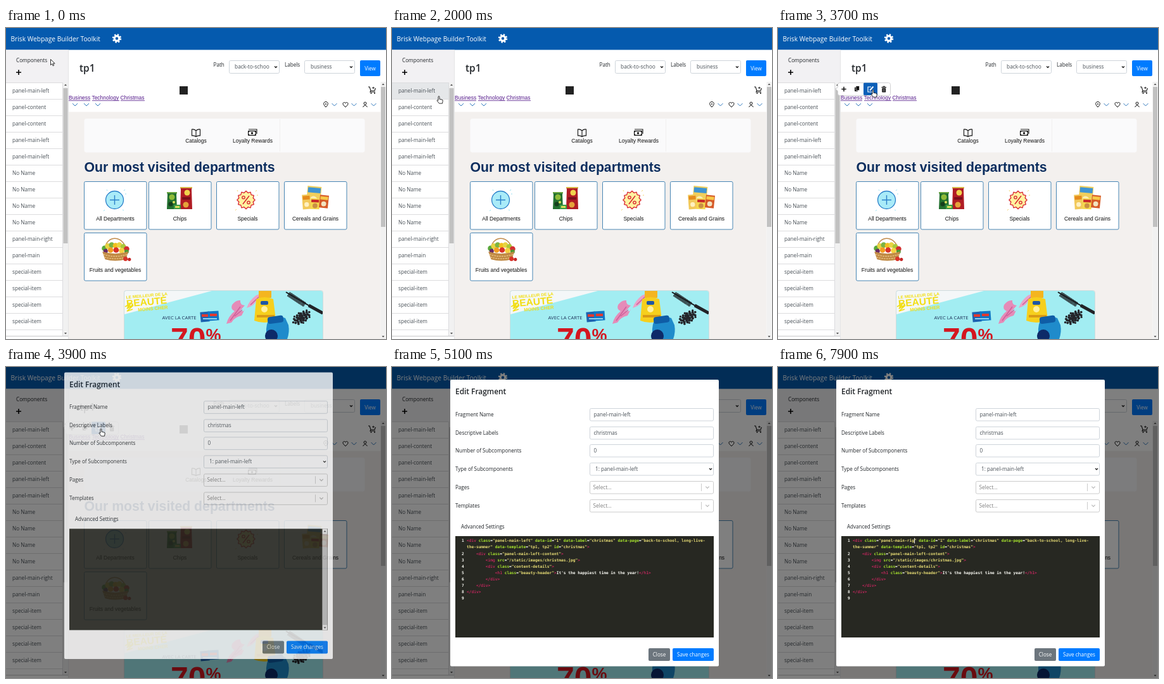
An HTML page that plays this animation: 600 px wide and 491 px high, repeating every 8 s.

```html
<!DOCTYPE html>
<html lang="en">
<head>
<meta charset="utf-8">
<title>Page builder demo</title>
<style>
  html, body { margin: 0; width: 100%; height: 100%; overflow: hidden; background: #fff; }
  svg { display: block; width: 600px; height: 491px; }
  text { font-family: 'Open Sans', sans-serif; white-space: pre; }
  .shop text { font-family: 'Liberation Sans', Arial, sans-serif; }
  .shop .ui { font-family: 'Open Sans', sans-serif; }
  .code text { font: bold 6.2px 'DejaVu Sans Mono', monospace; }
</style>
</head>
<body>
<svg id="stage" viewBox="0 0 600 491" xmlns="http://www.w3.org/2000/svg"></svg>
<script>
const LOOP = 8000, STEP = 100;
const INK = '#212529', BLUE = '#007bff', CHAR = 6.2 * 0.602;

// Drawing helpers
const rect = (x, y, w, h, fill, more = '') =>
  `<rect x="${x}" y="${y}" width="${w}" height="${h}" fill="${fill}" ${more}/>`;
const box = (x, y, w, h, stroke, r = 2, fill = '#fff') =>
  rect(x + .5, y + .5, w - 1, h - 1, fill, `stroke="${stroke}" rx="${r}"`);
const text = (x, y, s, size = 8.15, fill = INK, more = '') =>
  `<text x="${x}" y="${y}" font-size="${size}" fill="${fill}" ${more}>${s}</text>`;
const mid = (x, y, s, size, fill) => text(x, y, s, size, fill, 'text-anchor="middle"');
const bold = (x, y, s, size, fill) => text(x, y, s, size, fill, 'font-weight="bold"');
const line = (d, stroke, w = 1, more = '') =>
  `<path d="${d}" fill="none" stroke="${stroke}" stroke-width="${w}" ${more}/>`;
const shape = (d, fill, more = '') => `<path d="${d}" fill="${fill}" ${more}/>`;
const dot = (x, y, r, fill, more = '') => `<circle cx="${x}" cy="${y}" r="${r}" fill="${fill}" ${more}/>`;
const ring = (x, y, r, stroke, w = 1, more = '') =>
  dot(x, y, r, 'none', `stroke="${stroke}" stroke-width="${w}" ${more}`);
const group = (id, s, more = '') => `<g id="${id}" ${more}>${s}</g>`;
const moved = (transform, s) => `<g transform="${transform}">${s}</g>`;
const chevron = (x, y, stroke, w = 1, r = 4) =>
  line(`M${x - r} ${y - r / 2}l${r} ${r}l${r} ${-r}`, stroke, w);
const plus = (x, y, r, stroke, w) => line(`M${x - r} ${y}h${2 * r}M${x} ${y - r}v${2 * r}`, stroke, w);

function scrollbar(x, y, h, thumbY, thumbH) {
  const c = x + 4, b = y + h;
  return rect(x, y, 8, h, '#f1f1f1') + rect(x + .5, thumbY, 7, thumbH, '#c1c1c1') +
    shape(`M${c - 2} ${y + 5}l2 -2.5l2 2.5z`, '#505050') +
    shape(`M${c - 2} ${b - 5}l2 2.5l2 -2.5z`, '#505050');
}

function topBar() {
  return rect(0, 0, 600, 34.5, '#055aae') +
    text(7.5, 21.3, 'Brisk Webpage Builder Toolkit', 10.2, '#fff') +
    ring(175, 16.5, 3.8, '#fff', 3.2) + ring(175, 16.5, 6, '#fff', 2.4, 'stroke-dasharray="2.36"');
}

function sidebar() {
  const names = ['panel-main-left', 'panel-content', 'panel-content', 'panel-main-left', 'panel-main-left',
    'No Name', 'No Name', 'No Name', 'No Name', 'panel-main-right', 'panel-main',
    'special-item', 'special-item', 'special-item', 'special-item'];
  const rows = names.map((s, i) =>
    text(10, 102 + 26 * i, s, 8.2, '#495057') + rect(0, 112 + 26 * i, 89.5, 1, '#dcdcde')).join('');
  return rect(0, 34.5, 98, 52, '#f2f1f3') + text(16, 54, 'Components', 8.2) + plus(20, 70, 4, '#000', 1.6) +
    rect(0, 86, 98, 1, '#dcdcde') + rect(0, 87, 89.5, 25, '#e5e7e9', 'id="hover"') + rows +
    rect(89, 86, 1, 400, '#dcdcde') + scrollbar(90, 86, 400, 95, 245) +
    rect(0, 486, 98, 1, '#c8c8ca') + rect(98, 34.5, 1, 457, '#e4e4e6');
}

function toolbar() {
  const select = (x, w) => box(x, 51, w, 21, '#ced4da') + chevron(x + w - 6, 61.5, '#222', 1.3, 2);
  return text(116, 68.5, 'tp1', 15.4, INK, 'font-weight="600"') +
    text(327.5, 61, 'Path') + text(440, 61, 'Labels') + select(352, 80) + select(471, 80) +
    text(361, 64.4, 'back-to-schoo', 8.4, '#495057') + text(481, 64.4, 'business', 8.2, '#495057') +
    rect(559, 51, 32, 25, BLUE, 'rx="2"') + mid(575, 66.6, 'View', 8.2, '#fff');
}

function shopHeader() {
  const link = '#551a8b', nav = '#2f78bd';
  const cart = line('M572 93h2l2 6h6l1.5 -4M576 99l-1 2h8', '#111', 1.1) +
    dot(576.5, 103, 1, '#111') + dot(582, 103, 1, '#111') + plus(580, 94.5, 1.8, '#111', .9);
  const pin = line('M505 125c-6 -6 -2.5 -8.5 0 -8.5s6 2.5 0 8.5z', '#111') + dot(505, 120, .9, '#111');
  const heart = line('M536 125l-3.5 -3.5c-2 -4 2.5 -5.5 3.5 -2.5c1 -3 5.5 -1.5 3.5 2.5z', '#111');
  const person = ring(567, 119, 2, '#111') + line('M563.5 125q3.5 -6 7 0', '#111');
  return rect(274, 92, 13, 13, '#222') +
    text(99, 113.3, 'Business Technology Christmas', 8.45, link) +
    [[99, 34], [136, 43], [181, 38]].map(([x, w]) => rect(x, 114.3, w, .8, link)).join('') +
    [109, 127, 145, 518.5, 549.5, 580.5].map(x => chevron(x, 121, nav)).join('') +
    cart + pin + heart + person;
}

function quickLinks() {
  const book = line('M300 162q-3 -2.5 -6.5 -2v10q3.5 -.5 6.5 1.5q3 -2 6.5 -1.5v-10q-3.5 -.5 -6.5 2v9.5', '#111', 1.1);
  const cash = line('M383 160h13v7', '#111', 1.1) + rect(382, 162, 13, 8, '#111', 'rx="1"') +
    rect(383.2, 163.2, 10.6, 5.6, '#fff', 'rx="2"') + dot(388.5, 166, 1.7, '#111');
  return rect(123.5, 143, 443, 53.5, '#fafafb', 'rx="4"') + rect(432, 144, 1, 51, '#f1f0ef') +
    book + cash + mid(300, 181, 'Catalogs', 8.5, '#111') + mid(389.5, 181, 'Loyalty Rewards', 8.5, '#111');
}

function allIcon() {
  return dot(171.5, 271.5, 14, '#a9ebf8', 'stroke="#2a7fc9" stroke-width="1.3"') +
    plus(171.5, 271.5, 7.5, '#2a7fc9', 1.4) +
    line('M186 257l2 -2M156 287l-2 2M188 262h2M160 257l-1 -2M184 287l2 1', '#7fd8ee', .8);
}

function chipsIcon() {
  const bag = (x, y, w, h, fill, lid) =>
    shape(`M${x} ${y}h${w}l-1 4l1 ${h - 4}h${-w}l1 ${4 - h}z`, fill) + rect(x, y, w, 2, lid);
  return bag(275, 251, 19, 35, '#b01c24', '#d8b848') + bag(254, 259, 16, 27, '#22702f', '#67a33f') +
    dot(262, 267, 4.5, '#8fbb38') + dot(260, 278, 3.5, '#143f1c') + dot(265, 275, 2, '#d9dd58') +
    dot(286, 260, 4.5, '#f0d34c') + rect(278, 267, 13, 4, '#7a0f1b') + dot(284, 279, 4.5, '#e6a33a') +
    rect(265, 279, 11, 7, '#3b9a44') + rect(267, 281, 7, 3, '#d9dd58');
}

function specialsIcon() {
  const star = Array.from({ length: 24 }, (_, i) => {
    const a = i * Math.PI / 12, r = i % 2 ? 11.6 : 14.2;
    return `${(379 + r * Math.cos(a)).toFixed(1)},${(271.5 + r * Math.sin(a)).toFixed(1)}`;
  }).join(' ');
  const red = '#d8232f';
  return `<polygon points="${star}" fill="#fff3a0" stroke="${red}" stroke-width="1.3" stroke-linejoin="round"/>` +
    line('M384 265l-10 13', red, 1.5) + ring(375, 267.5, 2.2, red, 1.3) + ring(383, 275.5, 2.2, red, 1.3) +
    line('M394 258l2 -2M364 286l-2 2M396 264h2M366 258l-1 -2', '#f2c94c', .8);
}

function cerealIcon() {
  const pack = (x, y, w, h, tilt, fill, top, spot) => moved(`rotate(${tilt} ${x + w / 2} ${y + h / 2})`,
    rect(x, y, w, h, fill) + rect(x + 1, y + 2, w - 2, h * .25, top) + dot(x + w / 2, y + h * .68, w * .28, spot));
  return pack(475, 250, 22, 32, 5, '#f0cf5c', '#3f94d2', '#fbeeb8') +
    pack(468, 263, 13, 23, -4, '#f2c95a', '#e58b1d', '#fff0c0') +
    pack(481, 269, 14, 17, 2, '#f5d84d', '#c92a2a', '#c98f45') +
    pack(495, 264, 14, 20, 6, '#d65a28', '#f7c948', '#f2e3c0');
}

function basketIcon() {
  const fruit = [['#58a83a', 157, 347, 5], ['#e8d442', 163, 343, 5], ['#7cb342', 170, 341, 5], ['#f2c01e', 177, 342, 5],
    ['#e8d442', 184, 341, 5], ['#a8c93a', 191, 344, 5], ['#d32f2f', 197, 348, 5], ['#6a2b63', 159, 352, 4],
    ['#f39c1f', 168, 350, 5], ['#d8342a', 178, 350, 5], ['#f4d03f', 188, 351, 5], ['#4c9a34', 197, 353, 4]];
  return moved('translate(19 46) scale(.87)',
    line('M157 352C158 322 190 322 196 348', '#c08a4a', 1.6) +
    fruit.map(([c, x, y, r]) => dot(x, y, r, c)).join('') +
    shape('M153 353Q176 360 200 353L196 367Q176 372 158 367z', '#c08a45') +
    line('M155 358Q176 365 198 358M157 363Q176 369 197 363', '#ecc584', 1.5, 'stroke-dasharray="3 1.5"') +
    dot(195, 366, 4, '#d8342a') + dot(202, 367, 3, '#c62828'));
}

function departments() {
  const cards = [[123, 242, 'All Departments'], [225, 242, 'Chips'], [332, 242, 'Specials'],
    [439, 242, 'Cereals and Grains'], [123, 323, 'Fruits and vegetables']];
  return bold(123.5, 227, 'Our most visited departments', 21.25, '#0b2d5e') +
    cards.map(([x, y, s]) => box(x, y, 99.5, 76.5, '#4886b4') + mid(x + 49.5, y + 61.5, s, 8.5, '#111')).join('') +
    allIcon() + chipsIcon() + specialsIcon() + cerealIcon() + basketIcon();
}

// Repeatable scatter of crumbs for the black powder
function crumbs(cx, cy, count) {
  return Array.from({ length: count }, (_, i) => {
    const a = i * 2.4, d = 1.7 * Math.sqrt(i);
    return dot((cx + d * 1.5 * Math.cos(a)).toFixed(1), (cy + d * Math.sin(a) - d * .6 * Math.cos(a)).toFixed(1),
      (2.6 - i * .03).toFixed(1), '#24252a');
  }).join('');
}

function banner() {
  const yellow = '#f2de14', red = '#d4161f';
  const slogan = shape('M187 415H325L187 452z', '#f4f7f8') +
    line('M188 440l9 -5l-6 8l10 -5l-10 9l9 -3', yellow, 1.6) +
    moved('rotate(-5 190 430)',
      bold(190, 427.5, 'LE MEILLEUR DE LA', 6.6, yellow) + bold(189.5, 440.5, 'BEAUTÉ', 15.6, yellow) +
      bold(207, 449, 'MOINS CHER', 7.4, yellow));
  const cards = rect(307, 448, 14, 16, '#1d63b0', 'transform="rotate(-5 314 456)"') +
    rect(319, 447, 17, 15, '#1277c4', 'transform="rotate(-4 327 455)"') +
    rect(309, 452, 10, 4, '#e2392f') + rect(322, 451, 11, 4, '#e2392f') + rect(311, 458, 22, 2, '#8fd0ee');
  const powder = shape('M348 467q3 -12 13 -20q-7 -3 -4 -10q6 -8 13 -7q-1 7 7 8l-8 9q8 1 8 -3l-5 10q-12 3 -16 11z', '#e58bb8') +
    shape('M380 442q4 -12 15 -20l14 -5q-9 7 -14 14q-4 8 -15 11z', '#e9a3c8') +
    line('M354 462l16 -22M361 455l12 -10M386 437l14 -13', '#cf5f99', 1.5);
  const mascara = line('M446 420L472 437', '#17181b', 8, 'stroke-dasharray="1.3 .5"') +
    line('M442 417L500 451', '#17181b', 2) + line('M478 438L500 450', '#222327', 5) + crumbs(467, 457, 34);
  const tube = rect(399, 413, 20, 13, '#f4b51f') + shape('M395 428q13 -6 27 0l4 32q-16 9 -34 2z', '#f6cf1d') +
    rect(396, 453, 28, 4, '#d99a16') + rect(402, 431, 12, 6, '#1f57a5', 'rx="2"') + dot(408, 444, 5, '#fff1a0');
  const bottle = shape('M414 462q12 -10 27 -4l5 11q2 11 -2 22h-32q-3 -18 2 -29z', '#1f8bcb') +
    rect(413, 455, 25, 11, '#0f5da6', 'rx="4" transform="rotate(-8 425 460)"') + dot(419, 486, 10, '#0d2a68');
  return `<clipPath id="ad">${rect(187, 415, 313, 90, '#000', 'rx="3"')}</clipPath><g clip-path="url(#ad)">` +
    rect(187, 415, 313, 90, '#a2edf2') + slogan +
    text(246.5, 459.5, 'AVEC LA CARTE', 7.7, '#20365c', 'class="ui"') + cards +
    bold(260, 509, '70', 50, red) + bold(315.5, 494, '%', 27, red) +
    powder + mascara + tube + bottle + '</g>' +
    rect(186.5, 414.5, 314, 90, 'none', 'stroke="#cfdcdd" rx="3"');
}

function popover() {
  const copy = rect(121, 93.5, 5, 6.5, '#111', 'rx=".7"') +
    rect(123, 91.5, 5.5, 7, '#111', 'rx=".7" stroke="#fff" stroke-width=".7"');
  const pen = color => line('M147 93h-5v8h8v-4', color, 1.2) + line('M145 98.5l5.5 -6', color, 1.9);
  const bin = rect(163.5, 93, 7.5, 1.3, '#111') + rect(165.5, 91.7, 3.5, 1, '#111') +
    rect(164.2, 95, 6, 6.5, '#111', 'rx=".8"') + line('M166.2 96v4.5M168.2 96v4.5', '#fff', .5);
  return box(94, 86, 84, 21, '#d0d0d2', 3) +
    shape('M95 93l-4 3.5l4 3.5z', '#fff', 'stroke="#c4c4c6" stroke-width=".6"') +
    rect(94.6, 93, 1.5, 7, '#fff') + plus(104, 96.5, 3.7, '#111', 1.5) + copy + bin +
    group('penOff', pen('#111')) + group('penOn', rect(135, 86.5, 22, 19.5, '#0b5fb8', 'rx="1.5"') + pen('#fff'));
}

// Markup colouring: t tag, a attribute, s string, p plain
const TONES = { t: '#f92672', a: '#a6e22e', s: '#e6db74', p: '#f8f8f2' };
const span = (tone, s, id = '') =>
  `<tspan fill="${TONES[tone]}" ${id} ${tone === 't' ? 'font-weight="normal"' : ''}>${s}</tspan>`;
const open = s => span('t', '&lt;' + s);
const close = s => span('t', `&lt;/${s}&gt;`);
const attr = (name, value, id) => span('a', ` ${name}`) + span('p', '=') + span('s', `"${value}"`, id);
const gt = span('t', '&gt;');

function code() {
  const lines = [
    [1, 0, open('div') + attr('class', 'panel-main-left', 'id="word"') + attr('data-id', 1) +
      attr('data-label', 'christmas') + span('a', ' data-page') + span('p', '=') + span('s', '"back-to-school, long-live-')],
    ['', 0, span('s', 'the-summer"') + attr('data-template', 'tp1, tp2') + attr('id', 'christmas') + gt],
    [2, 4, open('div') + attr('class', 'panel-main-left-content') + gt],
    [3, 8, open('img') + attr('src', '/static/images/christmas.jpg') + gt],
    [4, 8, open('div') + attr('class', 'content-details') + gt],
    [5, 12, open('h1') + attr('class', 'beauty-header') + gt + span('p', "It's the happiest time in the year!") + close('h1')],
    [6, 8, close('div')], [7, 4, close('div')], [8, 0, close('div')], [9, 0, '']
  ];
  return lines.map(([n, indent, s], i) => {
    const y = 276.3 + 10.1 * i;
    return `<text x="110" y="${y}" fill="#f8f8f2">${n}</text><text x="${118 + indent * CHAR}" y="${y}">${s}</text>`;
  }).join('') + rect(0, 270, 1, 8.5, '#f8f8f0', 'id="caret"');
}

function modal() {
  const fields = [['Fragment Name', 'panel-main-left'], ['Descriptive Labels', 'christmas'],
    ['Number of Subcomponents', '0'], ['Type of Subcomponents', '1: panel-main-left', 'list'],
    ['Pages', 'Select...', 'pick'], ['Templates', 'Select...', 'pick']];
  const kinds = {
    input: { x: 318.5, ink: '#495057', edge: '#ced4da', extra: () => '' },
    list: { x: 321, ink: '#495057', edge: '#ced4da', extra: y => chevron(503, y, '#222', 1.3, 2) },
    pick: { x: 317.5, ink: '#808080', edge: '#ccc', extra: y => rect(488, y - 6, 1, 12, '#ccc') + chevron(498, y, '#bbb', 1.3, 2.7) }
  };
  const form = fields.map(([label, value, kind = 'input'], i) => {
    const y = Math.round(75 + 28.7 * i), k = kinds[kind];
    return text(100, y + 3, label, 8.05) + box(312, y - 10, 196, 20.5, k.edge) +
      text(k.x, y + 3, value, 8.2, k.ink) + k.extra(y);
  }).join('');
  return rect(92, 20, 424, 452.5, '#fff', 'rx="2"') +
    text(100, 43.3, 'Edit Fragment', 11.9, INK, 'font-weight="600"') + form +
    text(109, 255, 'Advanced Settings', 8.05) + rect(100, 267, 408, 160, '#272822') +
    group('blank', scrollbar(499.5, 267, 160, 275, 144)) + group('code', code(), 'class="code"') +
    rect(405, 444, 34, 20, '#6c757d', 'rx="2"') + mid(422, 457, 'Close', 8.15, '#fff') +
    rect(443, 444, 65, 20, BLUE, 'rx="2"') + mid(475.5, 457, 'Save changes', 8.15, '#fff');
}

const edge = 'stroke="#000" stroke-width=".8"';
const arrow = shape('M0 0v9l2.2 -2l1.5 3.3l1.5 -.7l-1.5 -3.1h3z', '#fff', edge);
const hand = shape('M0 .8q1 -1.6 2 0v4l4 .8q1.5 .5 1.2 2l-.7 4h-5l-3.5 -4.5q.2 -1.6 2 -.2z', '#fff', edge);

const $ = id => document.getElementById(id);
$('stage').innerHTML = rect(0, 0, 600, 491, '#fff') + topBar() + sidebar() + toolbar() +
  group('shop', rect(99, 132.5, 492.5, 359, '#f3f0ee') + shopHeader() + quickLinks() + departments() + banner(), 'class="shop"') +
  scrollbar(591.5, 85, 406, 93, 221) + group('popover', popover()) +
  rect(0, 0, 600, 491, '#000', 'id="shade"') + group('modal', modal()) +
  group('mouse', group('arrow', arrow) + group('hand', hand));

// Timeline: [ms, x, y] and [ms, typed word]
const MOVES = [[0, 70.5, 49.5], [100, 70.5, 49.5], [900, 73, 107.5], [2400, 73, 107.5],
  [2900, 149, 97.5], [4200, 149, 97.5], [4600, 215, 268]];
const TYPING = [[5600, 'left'], [6000, 'lef'], [6300, 'le'], [6700, 'l'], [6900, ''],
  [7400, 'r'], [7600, 'ri'], [7800, 'rig']];

const clamp = v => Math.max(0, Math.min(1, v));
const show = (id, on) => $(id).setAttribute('visibility', on ? 'visible' : 'hidden');
const last = (table, t) => table.filter(row => row[0] <= t).pop() || table[0];

function mouseAt(t) {
  const from = last(MOVES, t), to = MOVES[MOVES.indexOf(from) + 1] || from;
  const p = to === from ? 0 : (t - from[0]) / (to[0] - from[0]);
  const e = p * p * (3 - 2 * p);
  return [1, 2].map(i => from[i] + (to[i] - from[i]) * e);
}

function draw(t) {
  const [x, y] = mouseAt(t);
  const seen = t < 4600, pointing = y > 86 && t <= 4200;
  $('mouse').setAttribute('transform', `translate(${x} ${y})`);
  show('arrow', seen && !pointing);
  show('hand', seen && pointing);
  show('hover', x < 90 && y > 86);

  const popped = t >= 2200, editing = popped && x > 135;
  show('popover', popped);
  show('penOn', editing);
  show('penOff', popped && !editing);

  $('shade').setAttribute('opacity', .5 * clamp((t - 3700) / 150));
  const slide = Math.pow(1 - clamp((t - 3780) / 300), 1.65);
  $('modal').setAttribute('opacity', clamp((t - 3780) / 150));
  $('modal').setAttribute('transform', `translate(0 ${-27 * slide})`);
  show('blank', t < 4100);
  show('code', t >= 4100);

  const [keyTime, word] = last(TYPING, t);
  $('word').textContent = `"panel-main-${word}"`;
  $('caret').setAttribute('x', 118 + (23 + word.length) * CHAR);
  show('caret', t >= keyTime && (t - keyTime) % 1060 < 530);
}

const start = performance.now();
function tick() {
  const t = (performance.now() - start) % LOOP;
  draw(Math.floor(t / STEP) * STEP);
  requestAnimationFrame(tick);
}
tick();
</script>
</body>
</html>
```
